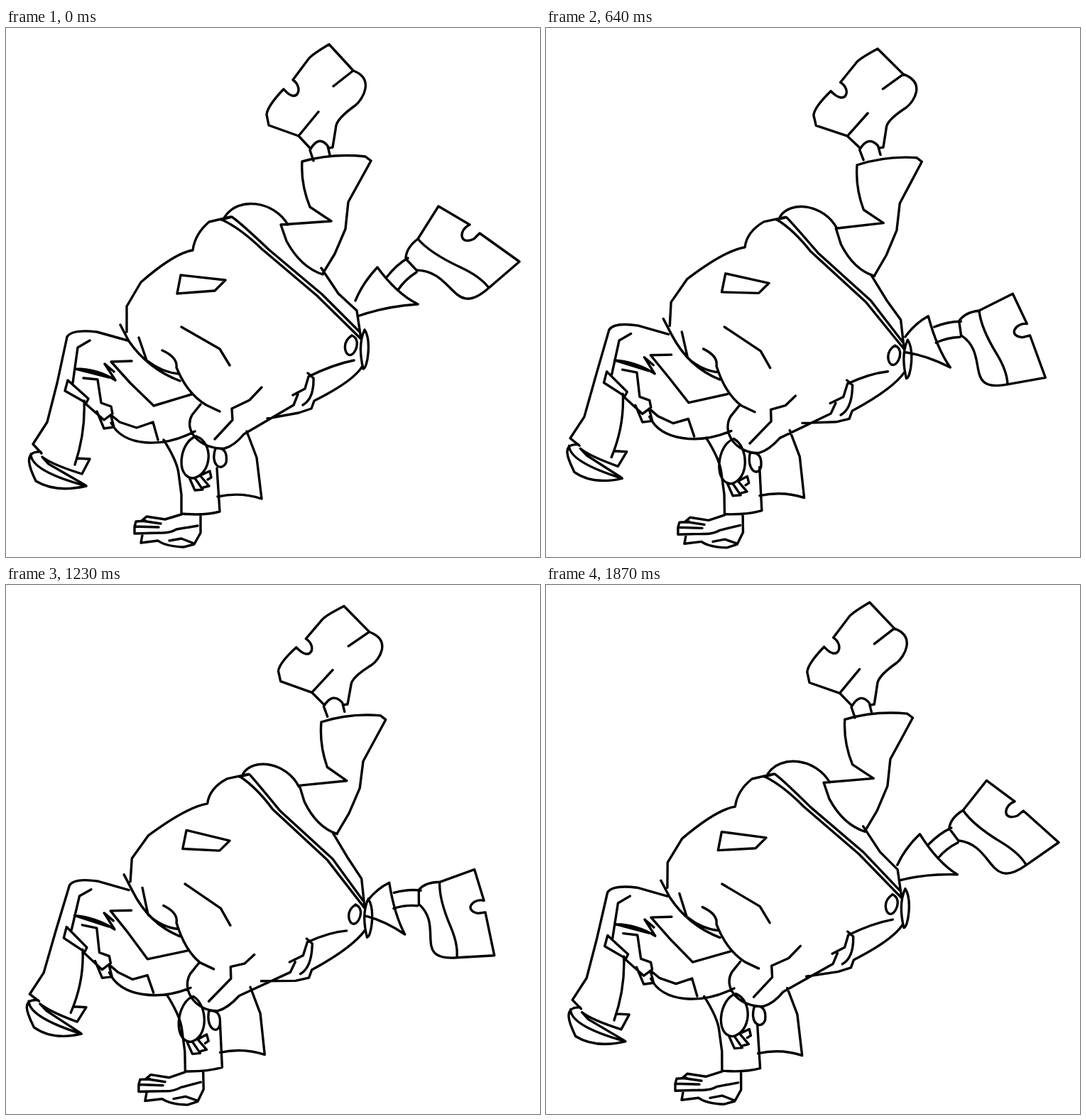
Animation of 752 by 745 pixels, one loop 1970 ms. Source, as an HTML page:

```html
<!DOCTYPE html>
<html lang="en">
<head>
<meta charset="utf-8">
<title>One-handed stand</title>
<style>
html, body { margin: 0; width: 100%; height: 100%; overflow: hidden; background: #fff }
svg { display: block; width: 752px; height: 745px }
path { fill: none; stroke: #000; stroke-width: 3.4; stroke-linecap: round; stroke-linejoin: round }
</style>
</head>
<body>
<svg viewBox="0 0 752 745"><path id="figure"/></svg>
<script>
const LOOP = 1970;
const STARTS = [0, 130, 260, 380, 510, 640, 740, 870, 1000, 1130, 1230, 1360, 1490, 1620, 1750, 1870];
const MID = 4, LOW = 7;   // steps at which limbs reach their middle and low poses
const parts = [];
const mix = (a, b, t) => a + (b - a) * t;

// Stiff limb: carried by a triangle that goes through three poses.
function limb(high, mid, low) {
  const [ax, ay, bx, by, cx, cy] = high;
  const det = (bx - ax) * (cy - ay) - (cx - ax) * (by - ay);
  return (x, y, step) => {
    const u = ((x - ax) * (cy - ay) - (cx - ax) * (y - ay)) / det;
    const v = ((bx - ax) * (y - ay) - (by - ay) * (x - ax)) / det;
    const corner = i => step < MID ? mix(high[i], mid[i], step / MID)
      : mix(mid[i], low[i], (step - MID) / (LOW - MID));
    return [0, 1].map(i => corner(i) * (1 - u - v) + corner(i + 2) * u + corner(i + 4) * v);
  };
}

// Soft body: each point follows the shifts of the nearest anchors [x, y, dx, dy].
function soft(...anchors) {
  return (x, y, step) => {
    let sum = 0, sx = 0, sy = 0;
    for (const [px, py, dx, dy] of anchors) {
      const w = (1 + (x - px) ** 2 + (y - py) ** 2) ** -1.5;
      sum += w;
      sx += w * dx;
      sy += w * dy;
    }
    return [x + sx / sum * step / LOW, y + sy / sum * step / LOW];
  };
}

const part = (move, ...paths) => parts.push({ move, path: paths.join('') });

// Upper boot
part(limb([455, 23, 370, 137, 460, 168], [458, 29, 374, 139, 469, 168], [485, 30, 393, 134, 487, 168]),
  'M455 23L489 60C520 72 502 101 492 109Q468 126 465 137L460 168L455 169',
  'M455 23Q428 39 425 45L404 73C420 84 410 109 391 86Q368 110 367 122L370 137L412 152L428 169',
  'M440 118L412 152M489 60L461 82',
  'M433 187L428 172Q440 150 453 166L456 179');

// Upper leg
part(limb([417, 188, 514, 187, 446, 347], [432, 193, 524, 187, 459, 348], [450, 193, 540, 191, 470, 352]),
  'M417 188Q460 176 506 181L514 187L482 245L478 283L463 318L446 346',
  'M417 188Q415 220 428 252L458 272L387 277L395 300Q415 337 446 347');

// Lower leg
part(limb([523, 337, 580, 389, 498, 405], [537, 392, 577, 464, 505, 447], [541, 433, 554, 506, 508, 476]),
  'M492 384Q503 358 523 337Q550 374 580 389Q535 392 498 405');

// Lower boot and ankle
part(limb([609, 251, 723, 329, 563, 325], [655, 348, 719, 463, 582, 396], [662, 427, 672, 551, 581, 446]),
  'M609 251L580 297Q563 310 563 325L578 341C632 342 629 411 680 366',
  'L723 329L667 289L659 297C638 307 637 284 653 277Z',
  'M580 297Q597 317 640 337Q668 350 680 366',
  'M536 351Q550 333 566 324M552 369Q562 354 578 344');

// Torso
part(soft([303, 270, 30, 0], [346, 249, 23, 8], [397, 277, 18, 8], [263, 313, 24, -6], [190, 358, 12, -6],
  [170, 428, 6, -12], [309, 355, 7, 6], [243, 360, 9, -3], [247, 421, 6, 0], [315, 475, 1, 5],
  [500, 438, 6, 20], [444, 338, 19, 13], [230, 480, 0, -3], [290, 535, -10, 1]),
  'M308 266C327 237 377 243 397 277',
  'M316 266L286 273Q266 290 263 313Q237 317 190 358L170 392L170 428',
  'M303 270L318 266Q330 274 370 312L445 375L498 428',
  'M304 270Q330 282 360 311L438 377L500 438',
  'M444 338L468 374L494 398L500 438',
  'M246 348L309 355L294 370L241 374Z',
  'M247 421L301 452L315 475',
  'M161 418L173 441Q200 480 245 497M187 436L198 468Q220 485 243 487',
  'M220 454Q242 464 240 478Q255 515 282 531L301 540',
  'M487 433C505 440 485 475 478 454Q475 441 487 433',
  'M505 425C515 440 509 480 503 480Q495 446 505 425');

// Bent arm and its hand
part(soft([490, 468, -12, 22], [502, 476, 4, 12], [430, 490, -2, 14], [432, 530, -4, 20], [368, 550, -10, 9],
  [360, 506, -12, 17], [318, 538, -2, 2], [308, 592, -11, 9], [262, 545, -3, 3], [272, 640, -4, 11]),
  'M490 468Q460 474 426 491M502 476Q490 497 434 525L430 536L412 542L368 550',
  'M425 486L433 493Q434 522 418 531M426 491L421 508L404 517',
  'M411 516L405 531L335 572Q322 588 308 592C275 594 249 568 262 545L274 530',
  'M360 506L343 524L318 536L319 552L294 579',
  'M268 575C244 582 238 634 264 634C290 628 293 584 268 575',
  'M295 592C287 615 303 626 310 612Q313 590 295 592',
  'M258 633L266 651L277 650L266 634M278 647L286 645L273 630M284 636L289 633L287 624L276 629');

// Supporting arm, cape and hand on the ground
part(soft([225, 580, 5, -4], [350, 600, 6, -2], [301, 681, 4, -2], [220, 705, 7, 2]),
  'M222 580Q241 610 243 627L247 657L247 684Q280 687 301 681L297 620',
  'M339 568L353 605L360 663Q330 653 298 660',
  'M247 685L224 692L198 688L191 694L218 698M197 694L183 695L181 702L215 703M181 702L181 712L214 711',
  'M192 714L190 725L214 722Q225 730 250 731L265 727L274 711L274 686',
  'M214 711Q230 712 240 706L270 701M230 722L247 719L265 726');

// Far leg
part(soft([150, 440, 3, -12], [86, 435, 4, -14], [94, 490, -2, -17], [50, 570, -6, -10], [112, 635, -8, -15],
  [38, 620, -3, -18], [110, 570, -2, -14], [138, 545, -3, -12], [150, 475, -1, -13], [208, 532, -10, -6],
  [266, 540, -7, 0]),
  'M171 440L128 428Q93 424 86 435L72 500L58 555L38 586L50 599',
  'M118 440L101 450L94 500M110 525Q112 570 97 615',
  'M49 597C20 595 37 627 42 638Q70 655 113 645Q35 624 35 600',
  'M100 606L118 607L107 628Q65 615 51 604L60 614L112 644',
  'M98 480Q128 480 154 496L139 473L152 484M98 480L145 492',
  'M177 469L148 470L175 500L208 532L261 516',
  'M87 496L83 511L113 528L116 522Z',
  'M109 493L129 495L134 528L148 533L150 543L138 552L113 530',
  'M128 540L138 564L152 562L148 547',
  'M148 545L160 555L184 563L207 555L214 580',
  'M148 556C165 590 220 592 266 568');

const pose = step => parts.map(({ move, path }) =>
  path.replace(/(\d+) (\d+)/g, (_, x, y) => move(+x, +y, step).map(v => v.toFixed(1)).join(' '))).join('');

const figure = document.getElementById('figure');
const begin = performance.now();
let shown = -1;
function tick() {
  const time = (performance.now() - begin) % LOOP;
  const index = STARTS.filter(s => s <= time).length - 1;
  const step = Math.min(index, STARTS.length - index);   // down, then back up
  if (step !== shown) figure.setAttribute('d', pose(shown = step));
  requestAnimationFrame(tick);
}
tick();
</script>
</body>
</html>
```
